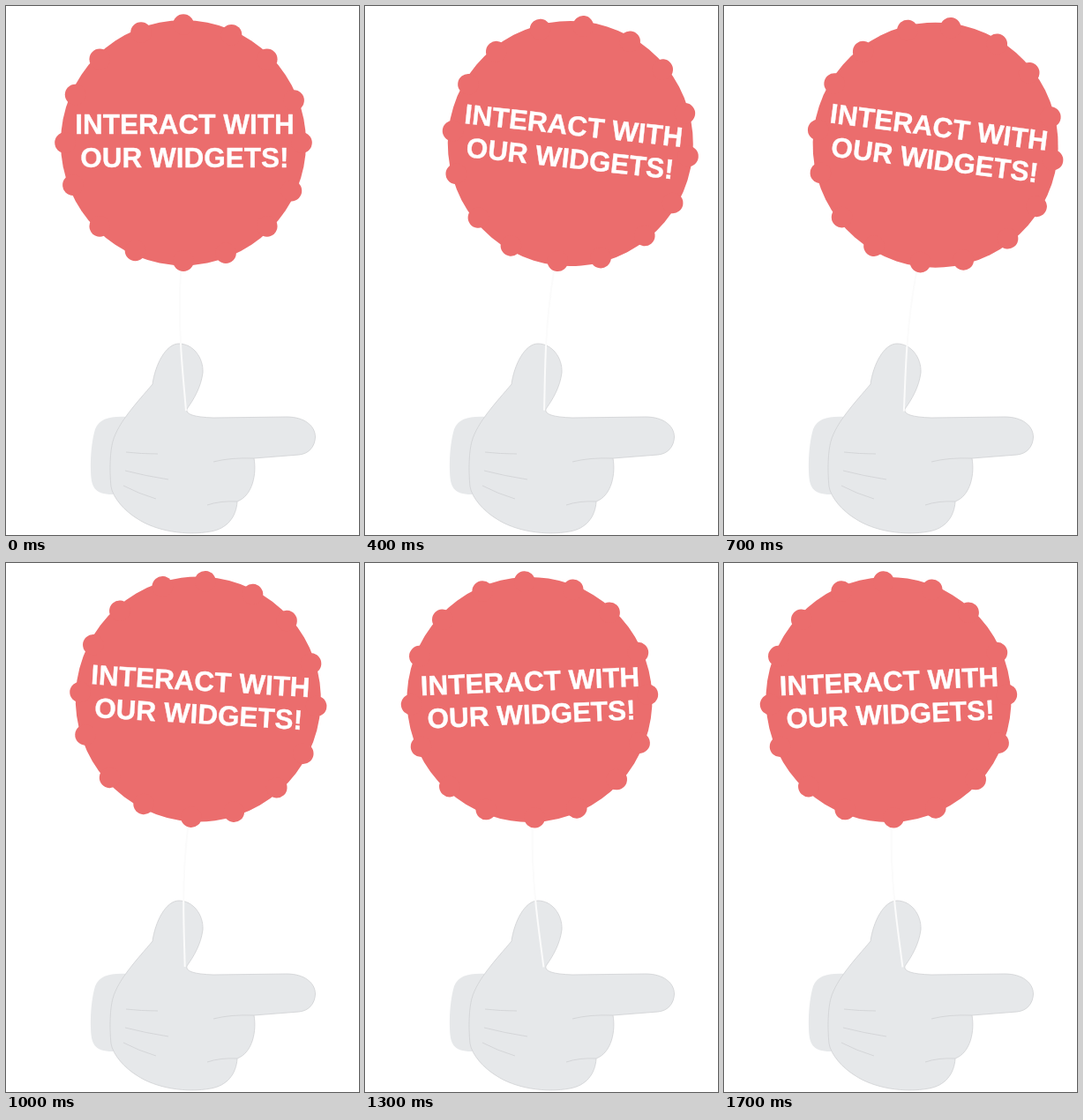
These frames come from a looping animation (400 by 600 pixels, 1.8 s). An HTML page with a canvas:

```html
<!DOCTYPE html>
<html lang="en">
<head>
<meta charset="utf-8">
<title>Balloon</title>
<style>
  html, body { margin: 0; width: 100%; height: 100%; overflow: hidden; background: #fff; }
  canvas { display: block; width: 400px; height: 600px; }
</style>
</head>
<body>
<canvas id="stage"></canvas>
<script>
const STEP_MS = 100, STEPS = 18;
const RED = '#eb6d6d', GLOVE = '#e6e8ea', CREASE = '#d0d1d3';

const canvas = document.getElementById('stage');
const ctx = canvas.getContext('2d');
const ratio = window.devicePixelRatio || 1;
canvas.width = 400 * ratio;
canvas.height = 600 * ratio;

const cuff = new Path2D('M137 466 C118 465 106 468 101 480 C97 493 95.5 512 96 527 C96.5 544 99 554 121 554 L140 540 Z');
const glove = new Path2D(`M166 429 C169 407 181 383 196 383
  C212 383 224 399 223 416 C221 432 213 446 205 457
  Q202 466 235 467 L318 466 C338 466 350.5 476 350.5 489
  C350 500 343 508 332 509 L281 513 C284 530 280 555 262 562
  C261 580 250 593 232 596 C205 601 170 596 148 581
  C135 573 121 558 119 545 C117 525 118 505 121 494
  C127 472 150 448 166 429 Z`);
const creases = new Path2D(`M235 517 Q254 512 281 513 M228 566 Q243 561 262 562
  M136 506 Q153 508 172 508 M135 527 Q158 533 184 537 M133 544 Q150 553 170 559`);

// Balloon parts are placed around the balloon's centre.
const thread = new Path2D('M-3 146 C-5 180 -4 210 -3 228 C-2 250 1 280 3 304');

const slowing = (p, amount) => p * (1 + amount * (1 - p));

function poseAt(step) {
  const right = step <= 12;
  const p = right ? 1 - Math.abs(6 - step) / 6 : 1 - Math.abs(15 - step) / 3;
  const dip = 2.1 * p * p - 1.1 * p;
  return right
    ? { x: 201 + 45 * slowing(p, 0.18), y: 155.1 + 4.8 * dip, angle: 8.3 * slowing(p, 0.35) }
    : { x: 201 - 33.5 * slowing(p, 0.45), y: 155.1 + 1.5 * dip, angle: -6.1 * slowing(p, 0.3) };
}

function disc(x, y, r) {
  ctx.beginPath();
  ctx.arc(x, y, r, 0, 2 * Math.PI);
  ctx.fill();
}

function label(text, x, y) {
  ctx.fillText(text, x, y);
  ctx.strokeText(text, x, y);
}

function drawHand() {
  ctx.fillStyle = GLOVE;
  ctx.fill(cuff);
  ctx.fill(glove);
  ctx.strokeStyle = CREASE;
  ctx.lineWidth = 0.8;
  ctx.stroke(glove);
  ctx.stroke(creases);
}

function drawBalloon({ x, y, angle }) {
  ctx.save();
  ctx.translate(x, y);
  ctx.rotate(angle * Math.PI / 180);

  ctx.strokeStyle = '#fbfbfb';
  ctx.lineWidth = 2;
  ctx.stroke(thread);

  ctx.fillStyle = RED;
  disc(0, 0, 139);
  for (let i = 0; i < 16; i++) {
    const a = (i * 22.5 + (i % 2) * 1.5) * Math.PI / 180;
    disc(134 * Math.cos(a), 134 * Math.sin(a), 11.8);
  }

  ctx.fillStyle = ctx.strokeStyle = '#fff';
  ctx.lineWidth = 0.4;
  ctx.lineJoin = 'round';
  ctx.font = 'bold 31.5px "Liberation Sans", Arial, sans-serif';
  ctx.textAlign = 'center';
  label('INTERACT WITH', 1.4, -9.8);
  label('OUR WIDGETS!', 1.4, 27.6);
  ctx.restore();
}

function draw() {
  const step = Math.floor(performance.now() / STEP_MS) % STEPS;
  ctx.setTransform(ratio, 0, 0, ratio, 0, 0);
  ctx.fillStyle = '#fff';
  ctx.fillRect(0, 0, 400, 600);
  drawHand();
  drawBalloon(poseAt(step));
  requestAnimationFrame(draw);
}
draw();
</script>
</body>
</html>
```
